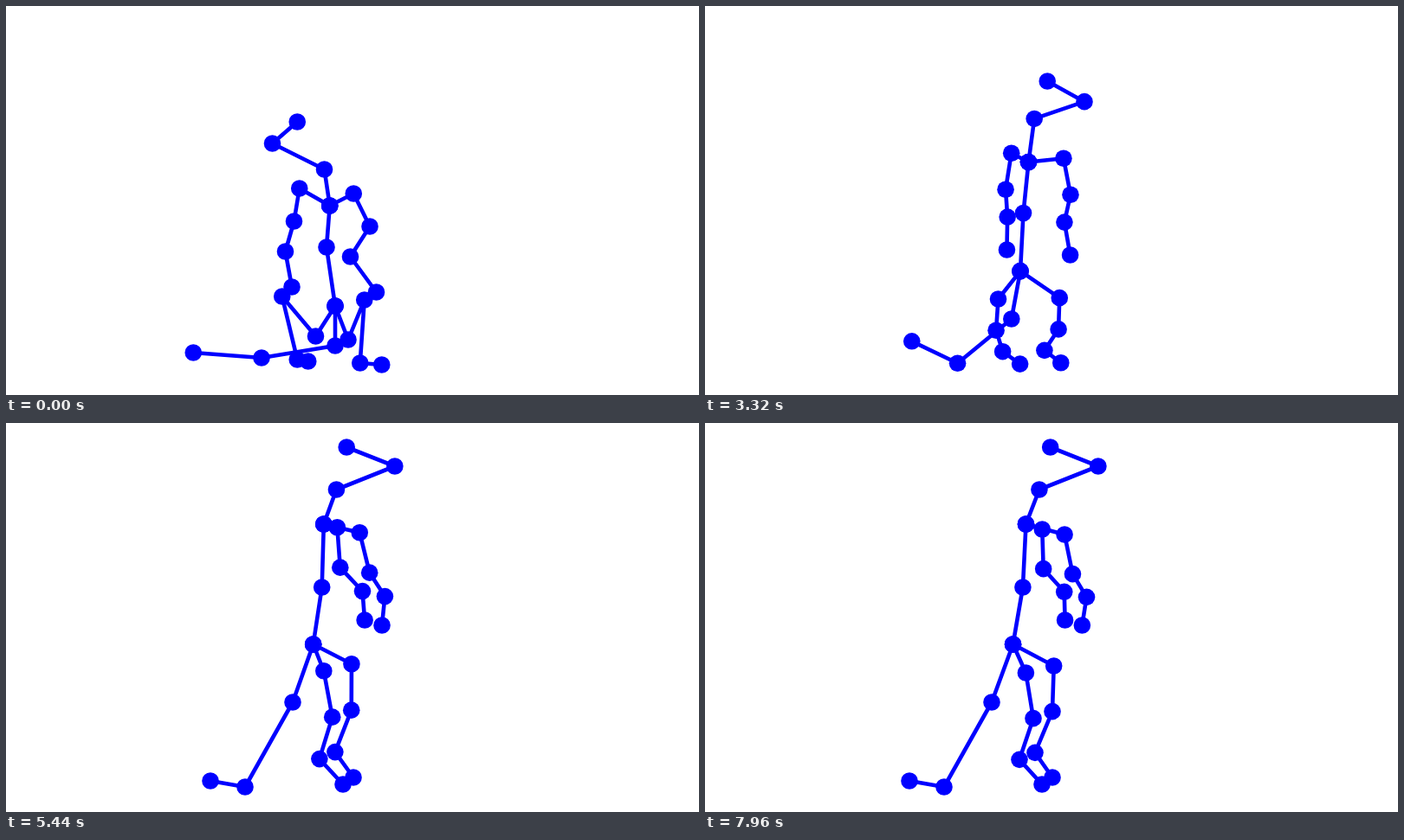
An HTML page with a canvas for the animation above (8 s loop, 800 by 450 pixels).

```html
<!DOCTYPE html>
<html lang="en">
<head>
<meta charset="utf-8">
<title>Skeleton standing up</title>
<style>
  html, body { margin: 0; width: 100%; height: 100%; overflow: hidden; background: #fff; }
  canvas { display: block; }
</style>
</head>
<body>
<canvas id="stage" width="800" height="450"></canvas>
<script>
const LOOP = 8000;
const CHEST = 3, PELVIS = 5;
const ctx = document.getElementById('stage').getContext('2d');

// Spine: snout to tail tip as [x, y].
// Limbs: left/right pairs as [centre x, centre y, half the distance].
const sitting = {
  spine: [[337, 134], [314, 159], [362, 173], [367, 231], [364, 279], [372, 347], [372, 393], [304, 407], [241, 401]],
  arms: [[364, 214, 19], [363, 252, 29], [344, 287, 24], [353, 328, 33]],
  legs: [[369, 384, 15], [361, 338, 38], [366, 411, 29], [381, 413, 34]]
};
const standing = {
  spine: [[389, 28], [445, 50], [378, 77], [364, 117], [363, 190], [354, 256], [331, 323], [276, 421], [236, 414]],
  arms: [[390, 122, 13], [399, 169, 17], [422, 197, 13], [423, 231, 10]],
  legs: [[380, 281, 16], [386, 335, 11], [370, 384, 9], [395, 414, 6]]
};

const lerp = (a, b, k) => a + (b - a) * k;
const progress = (t, from, to) => Math.min(1, Math.max(0, (t - from) / (to - from)));
const smooth = (t, from, to) => { const u = progress(t, from, to); return u * u * (3 - 2 * u); };
const bump = (t, from, to) => Math.sin(Math.PI * progress(t, from, to)) ** 2;
const blend = (part, k) =>
  sitting[part].map((point, i) => point.map((v, j) => lerp(v, standing[part][i][j], k)));

// Splits the pairs of a limb into its left and right chain.
const sides = (limb, tilt) => [-1, 1].map(side =>
  limb.map(([x, y, half]) => [x + side * half, y + side * tilt]));

function chainsAt(t) {
  const crouch = 1 - smooth(t, 0, 800);
  const rise = smooth(t, 2600, 4160);
  const turn = smooth(t, 2700, 3520);
  const push = bump(t, 2700, 3900);
  const drift = 1 - (1 - progress(t, 4600, LOOP)) ** 2;
  const lean = 30 * bump(t, 3000, 4300) + 8 * drift;

  const spine = blend('spine', rise), arms = blend('arms', rise), legs = blend('legs', rise);

  // The head turns ahead of the body and is drawn in while crouched.
  const [snout, head, neck] = spine, tailTip = spine.at(-1);
  const turned = blend('spine', turn);
  snout[0] = turned[0][0];
  head[0] = turned[1][0];
  neck[1] += 16 * crouch;
  tailTip[1] -= 19 * push;

  // Limbs open while pushing up; the joints near the body settle last.
  arms.forEach((joint, n) => {
    joint[0] += 6 * n * crouch;
    joint[2] += 6 * crouch + 14 * push;
  });
  legs.forEach((joint, n) => joint[2] += 20 * push / (1 + n * n));
  legs[1][1] += 38 * push;
  for (const limb of [arms, legs]) {
    limb.forEach((joint, n) => {
      joint[0] += 6 * drift * (1 - n / 3);
      joint[1] += 4 * drift * (1 - n / 3);
    });
  }

  const chains = [
    spine,
    ...sides(arms, 3).map(arm => [spine[CHEST], ...arm]),
    ...sides(legs, lerp(2, -4, rise)).map(leg => [spine[PELVIS], ...leg])
  ];

  // Crouching widens the whole figure; leaning grows with height.
  return chains.map(chain => chain.map(([x, y]) => [
    x + (x - 340) * 0.25 * crouch + lean * Math.max(0, (300 - y) / 225), y
  ]));
}

function draw(t) {
  const chains = chainsAt(t);
  ctx.fillStyle = '#fff';
  ctx.fillRect(0, 0, 800, 450);
  ctx.fillStyle = ctx.strokeStyle = '#00f';
  ctx.lineWidth = 4.6;
  ctx.lineJoin = 'round';
  for (const chain of chains) {
    ctx.beginPath();
    for (const [x, y] of chain) ctx.lineTo(x, y);
    ctx.stroke();
    for (const [x, y] of chain) {
      ctx.beginPath();
      ctx.arc(x, y, 9.8, 0, 2 * Math.PI);
      ctx.fill();
    }
  }
}

const start = performance.now();
function frame() {
  draw((performance.now() - start) % LOOP);
  requestAnimationFrame(frame);
}
frame();
</script>
</body>
</html>
```
